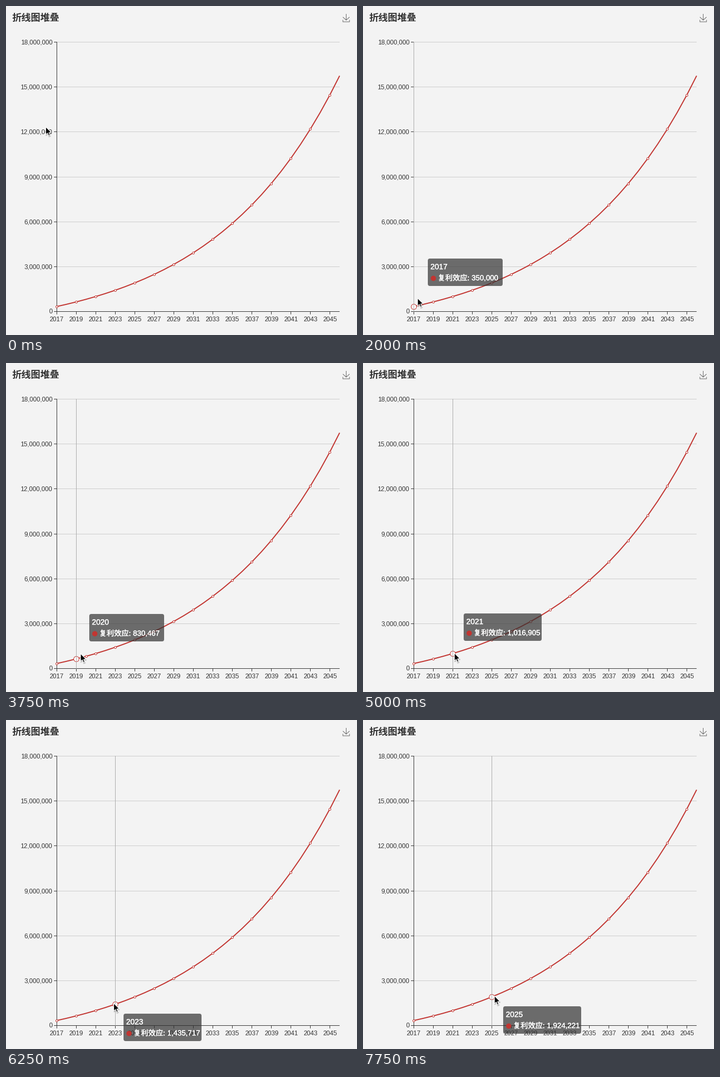
Animation of 666x624 px, one loop 8000 ms. Source, as a matplotlib script:

```python
import matplotlib.pyplot as plt
import matplotlib.patheffects as pe
import numpy as np
from matplotlib.animation import FuncAnimation
from matplotlib.patches import FancyBboxPatch, Polygon

W, H, DPI = 666, 624, 100
PX = 72 / DPI
FRAMES, STEP = 32, 250

BG, INK, GRID, RED = "#f3f3f3", "#333333", "#cccccc", "#c23531"
LATIN, CJK = "Liberation Sans", "Noto Sans CJK JP"
LEFT, RIGHT, TOP, BASE = 96, 633, 68, 580
YEARS = np.arange(2017, 2047)
SLOT = (RIGHT - LEFT) / (len(YEARS) - 1)

# 8 % growth plus a yearly deposit of 120,000
VALUES = 1_850_000 * 1.08 ** np.arange(len(YEARS)) - 1_500_000
XS = LEFT + SLOT * np.arange(len(YEARS))
YS = BASE - VALUES / 18e6 * (BASE - TOP)

# pointer: down to the axis, a pause, then along the curve
KEYS = [(0, 75, 229), (0.5, 57, 400), (1, 73, 553), (1.25, 73, 553),
        (1.5, 94, 556), (2.75, 117, 551), (3, 117, 551), (3.75, 141, 551),
        (5, 173, 550), (6.25, 204, 537), (7.75, 249, 523)]
KEY_T, KEY_X, KEY_Y = zip(*KEYS)

ARROW = np.array([(0.4, 0.2), (0.4, 15), (3.8, 11.9), (6.1, 17.2),
                  (8.5, 16.2), (6.3, 11.1), (10.9, 10.7)])

fig = plt.figure(figsize=(W / DPI, H / DPI), dpi=DPI, facecolor=BG)
ax = fig.add_axes([0, 0, 1, 1])
ax.set_xlim(0, W)
ax.set_ylim(H, 0)
ax.axis("off")


def line(xs, ys, color, width=1, z=1):
    return ax.plot(xs, ys, color=color, lw=width * PX, zorder=z, snap=False,
                   solid_capstyle="butt", solid_joinstyle="round")[0]


def text(x, y, s, size, color=INK, font=LATIN, z=3, **kw):
    return ax.text(x, y, s, fontsize=size * PX, color=color, family=font,
                   zorder=z, va="baseline", **kw)


def ring(xs, ys, diameter, z):
    return ax.plot(xs, ys, "o", ms=diameter * PX, mfc="white", mec=RED,
                   mew=PX, zorder=z, snap=False)[0]


def crisp(v):
    """Centre of the pixel that holds v."""
    return int(v) + 0.5


def draw_chart():
    text(12, 28.2, "折线图堆叠", 18, font=CJK, weight="bold")

    for value in range(0, 18_000_001, 3_000_000):
        y = crisp(min(BASE - value / 18e6 * (BASE - TOP), BASE - 1))
        if value:
            line([LEFT + 1, RIGHT], [y, y], GRID)
        line([LEFT - 5, LEFT], [y, y], INK, z=2)
        text(88, y + 3.8, f"{value:,}", 12, ha="right")

    for x, year in zip(XS[::2], YEARS[::2]):
        line([crisp(x)] * 2, [BASE, BASE + 5], INK, z=2)
        text(x, 597.8, str(year), 12, ha="center")

    line([crisp(LEFT)] * 2, [TOP, BASE], INK, z=2)
    line([LEFT, RIGHT], [BASE - 0.5] * 2, INK, z=2)
    line(XS, YS, RED, 2, z=4)
    ring(XS[::2], YS[::2], 4, 5)


def draw_download_icon(x=645.5, y=15):
    grey = "#666666"
    line([x, x], [y, y + 11.8], grey)
    line([x - 6.3, x, x + 6.3], [y + 6, y + 11.8, y + 6], grey)
    line([x - 6.3, x - 6.3, x + 6.3, x + 6.3],
         [y + 11.3, y + 15, y + 15, y + 11.3], grey)


draw_chart()
draw_download_icon()

dot = ring([], [], 4, 5)
focus = ring([], [], 10, 6)
guide = line([], [], "#aaaaaa", z=7)

box = FancyBboxPatch((0, 0), 142, 52, fc=(50 / 255,) * 3, ec="none", alpha=0.7,
                     boxstyle="round,pad=0,rounding_size=4", zorder=10)
ax.add_patch(box)
bullet = ax.plot([], [], "o", ms=10 * PX, color=RED, mew=0, zorder=11)[0]
heavier = [pe.withStroke(linewidth=0.35 * PX, foreground="white")]
tip_style = dict(color="white", z=11, path_effects=heavier)
tip_year = text(0, 0, "", 14.5, **tip_style)
tip_name = text(0, 0, "复利效应:", 14, font=CJK, **tip_style)
tip_value = text(0, 0, "", 14, **tip_style)
hover_parts = [box, bullet, tip_year, tip_name, tip_value, dot, focus, guide]

shadow = Polygon(ARROW, fc="black", ec="black", lw=2 * PX, alpha=0.14, zorder=19)
arrow = Polygon(ARROW, fc="black", ec="white", lw=1.1 * PX, zorder=20)
ax.add_patch(shadow)
ax.add_patch(arrow)


def pointer(t):
    return np.interp(t, KEY_T, KEY_X), np.interp(t, KEY_T, KEY_Y)


def hovered(t):
    """Index of the year under the pointer."""
    return max(0, round((pointer(t)[0] + 1.5 - LEFT) / SLOT))


def place_tooltip(t, index, y):
    left = round(pointer(t - 0.2)[0] + 23.5)
    # below the pointer where it fits, otherwise above
    top = round(y + 20.4 if y + 72 < H - 5.5 else y - 75)
    value = f"{round(VALUES[index]):,}"
    box.set_bounds(left, top, 142 if len(value) == 7 else 148, 52)
    bullet.set_data([left + 9.5], [top + 36.5])
    tip_year.set_position((left + 5, top + 20.2))
    tip_year.set_text(str(YEARS[index]))
    tip_name.set_position((left + 19, top + 41.4))
    tip_value.set_position((left + 83, top + 41.2))
    tip_value.set_text(value)


def update(frame):
    t = frame * STEP / 1000
    x, y = pointer(t)
    arrow.set_xy(ARROW + (x, y))
    shadow.set_xy(ARROW + (x + 0.6, y + 1.8))

    active = t > 1.5
    for part in hover_parts:
        part.set_visible(active)
    if active:
        index = hovered(t)
        # guide and enlarged ring trail the pointer a little
        late = hovered(t - 0.1)
        dot.set_data([XS[index]], [YS[index]])
        focus.set_data([XS[late]], [YS[late]])
        guide.set_data([crisp(XS[late])] * 2, [TOP, BASE])
        place_tooltip(t, index, y)
    return []


anim = FuncAnimation(fig, update, frames=FRAMES, interval=STEP,
                     repeat=True, repeat_delay=0, blit=False)
plt.show()
```
